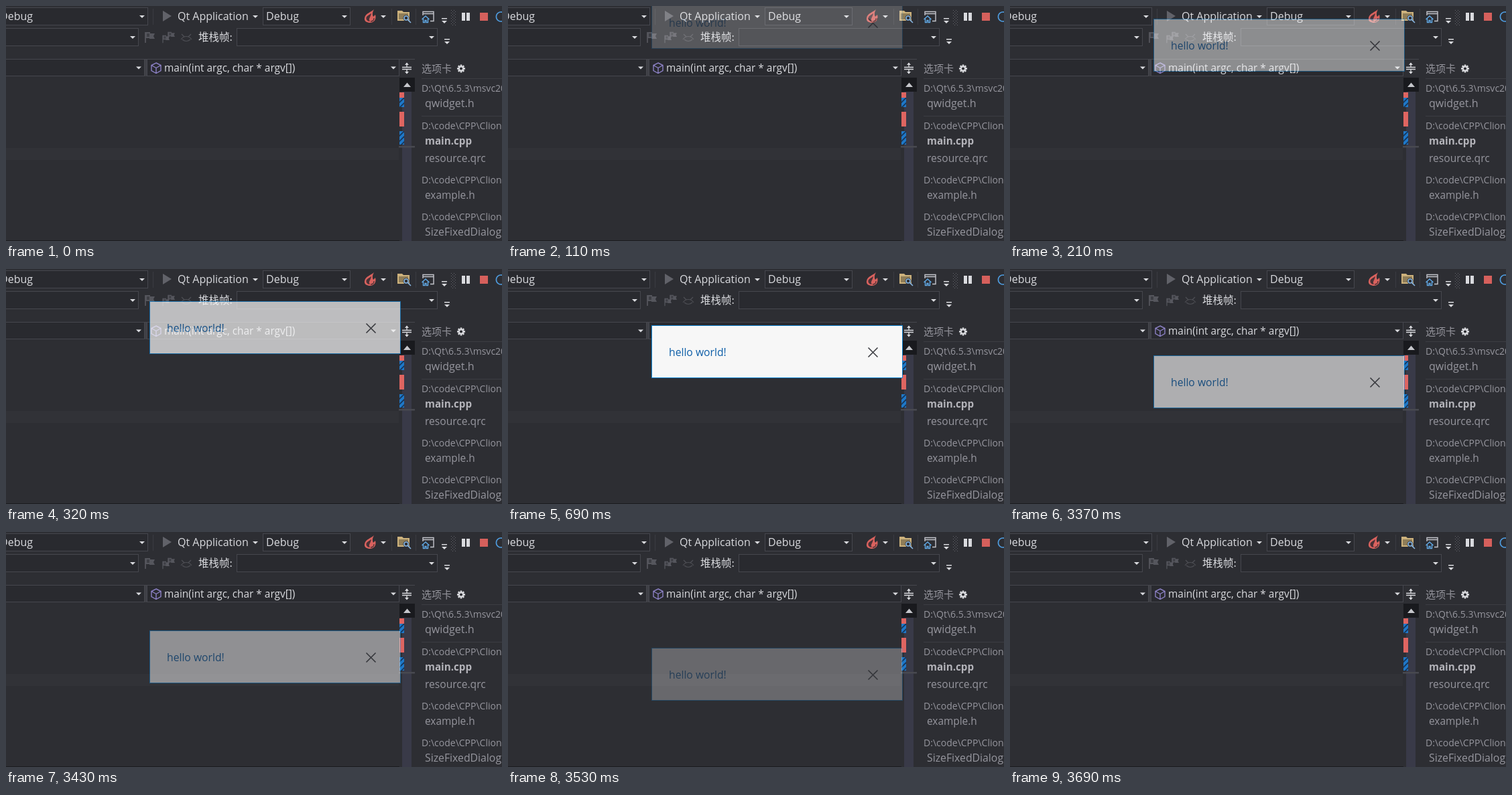
Animation, 740 px wide and 351 px high, one loop 3.94 s. Source, as an HTML page with a canvas:

```html
<!DOCTYPE html>
<html lang="zh">
<head>
<meta charset="utf-8">
<style>
  html, body { margin: 0; width: 100%; height: 100%; overflow: hidden; background: #2d2e33; }
  canvas { display: block; width: 740px; height: 351px; }
</style>
</head>
<body>
<canvas id="stage" width="740" height="351"></canvas>
<script>
const W = 740, H = 351, LOOP = 3940;
const FONT = '"Open Sans", "Noto Sans", "Noto Sans CJK SC", "Noto Sans CJK", sans-serif';
const CJK = '"Noto Sans CJK SC", "Noto Sans CJK", sans-serif';
const BG = '#2d2e33', LINE = '#46474e', LIGHT = '#d9dade', DIM = '#96969e';

function layer(w, h) {
  const c = document.createElement('canvas');
  c.width = w;
  c.height = h;
  return c;
}

function rect(g, x, y, w, h, color) {
  g.fillStyle = color;
  g.fillRect(x, y, w, h);
}

function frame(g, x, y, w, h, color, fill) {
  if (fill) rect(g, x, y, w, h, fill);
  g.strokeStyle = color;
  g.lineWidth = 1;
  g.strokeRect(x + .5, y + .5, w - 1, h - 1);
}

function text(g, s, x, y, size, color, weight = 400, family = FONT) {
  g.font = `${weight} ${size}px ${family}`;
  g.fillStyle = color;
  g.fillText(s, x, y);
}

function poly(g, pts, color) {
  g.beginPath();
  for (let i = 0; i < pts.length; i += 2) g.lineTo(pts[i], pts[i + 1]);
  g.closePath();
  g.fillStyle = color;
  g.fill();
}

function path(g, d, color, width = 1.2) {
  g.strokeStyle = color;
  g.lineWidth = width;
  g.stroke(new Path2D(d));
}

function shape(g, d, color) {
  g.fillStyle = color;
  g.fill(new Path2D(d));
}

function arrow(g, x, y, color = LIGHT) {
  poly(g, [x - 4, y - 2, x + 4, y - 2, x, y + 2], color);
}

function overflow(g, x, y) {
  rect(g, x - 4, y - 4, 8, 1.5, LIGHT);
  arrow(g, x, y + 2);
}

function combo(g, x, y, w, h) {
  frame(g, x, y, w, h, LINE, '#292a2f');
  arrow(g, x + w - 9, y + h / 2 + .5);
}

function toolbar(g) {
  combo(g, -20, 2, 232, 27);
  text(g, 'Debug', -9, 21, 16, LIGHT);
  rect(g, 219, 4, 1, 24, '#3b3c42');
  poly(g, [234, 7, 247, 15, 234, 23], '#616269');
  text(g, 'Qt Application', 256, 21, 16, LIGHT);
  arrow(g, 372, 16);
  combo(g, 383, 2, 131, 27);
  text(g, 'Debug', 388, 21, 16, LIGHT);

  // flame with a dark core
  shape(g, 'M549 5C545 9 536 11 535 18C534 23 539 25 543 25C549 25 553 20 551 13L548 16C546 12 547 9 549 5Z', '#d9625e');
  shape(g, 'M545 11C541 14 537 15 537.5 19C538 22 541 23 543 23C540 19 544 17 545 11Z', '#4a3136');
  path(g, 'M549 18C549 21 547 23 544 23', '#4a3136', 1.3);
  arrow(g, 563, 16);
  rect(g, 575, 4, 1, 24, '#3b3c42');

  // folder search
  shape(g, 'M584 7H591L593 9H602V22H584Z', '#cdb27c');
  rect(g, 586, 11, 14, 9, '#8f7d58');
  g.beginPath();
  g.arc(597, 18, 4.5, 0, 7);
  g.fillStyle = BG;
  g.fill();
  path(g, 'M600 18A3 3 0 1 1 594 18A3 3 0 1 1 600 18M599 20L604 25', '#86b6e4', 1.6);
  rect(g, 611, 4, 1, 24, '#3b3c42');

  // window with a house
  path(g, 'M622 14V8.5H638V22.5H633M622 11.5H638', '#c4c5cc', 1.4);
  path(g, 'M620.5 20L626 15L631.5 20M622.5 19V24.5H625V21.5H627V24.5H629.5V19', '#61a9e6', 1.4);
  overflow(g, 654, 22);
  for (let y = 6; y < 27; y += 4) {
    for (let x = 664; x < 670; x += 4) {
      rect(g, x, y, 1, 1, '#62636a');
      rect(g, x + 2, y + 2, 1, 1, '#62636a');
    }
  }
  rect(g, 680, 10, 5, 12, LIGHT);
  rect(g, 687, 10, 5, 12, LIGHT);
  rect(g, 707, 10, 12, 12, '#d6605c');
  path(g, 'M741 9.5A7 7 0 1 0 741 22.5', '#4f9de0', 1.6);
}

function flag(g, x, y) {
  path(g, `M${x} ${y}V${y + 16}`, '#5c5d64', 1.5);
  shape(g, `M${x} ${y}H${x + 7}V${y + 2}H${x + 14}L${x + 12} ${y + 6}L${x + 14} ${y + 10}H${x + 6}V${y + 9}H${x}Z`, '#55565d');
  rect(g, x + 2, y + 2, 4, 5, '#3d3e44');
}

function stackRow(g) {
  combo(g, -20, 33, 218, 27);
  flag(g, 208, 39);
  g.save();
  g.translate(234, 38);
  g.scale(.72, .72);
  flag(g, 0, 8);
  flag(g, 11, 1);
  g.restore();
  path(g, 'M261 50C265 44 273 44 277 50M263 50Q269 55 275 50M262 42L266 46M276 42L272 46', '#4e4f55', 1.2);
  text(g, '堆栈帧:', 287, 52, 15.5, LIGHT, 400, CJK);
  combo(g, 344, 33, 300, 27);
  overflow(g, 658, 53);
}

function navRow(g) {
  rect(g, 0, 79, 610, 1, LINE);
  combo(g, -20, 79, 227, 26);
  rect(g, 207, 80, 3, 25, '#3f4046');
  combo(g, 210, 79, 377, 26);
  path(g, 'M224 85L231 88.5V96.5L224 100.5L217 96.5V88.5ZM217 88.5L224 92.5L231 88.5M224 92.5V100.5', '#8b80c4', 1.4);
  text(g, 'main(int argc, char * argv[])', 236, 98, 15.4, LIGHT);
  path(g, 'M591 91.5H605M591 94.5H605M598 85V91M598 95V101', LIGHT, 1.3);
  poly(g, [595, 88, 601, 88, 598, 84.5], LIGHT);
  poly(g, [595, 98, 601, 98, 598, 101.5], LIGHT);
}

function marker(g, y, h) {
  rect(g, 587, y, 7, h, '#1f78c8');
  g.save();
  g.beginPath();
  g.rect(587, y, 7, h);
  g.clip();
  for (let k = y + 8; k < y + h + 6; k += 8) path(g, `M586 ${k}L595 ${k - 9}`, '#17365a', 1.6);
  g.restore();
}

function editor(g) {
  rect(g, 0, 212, 586, 18, '#313237');
  rect(g, 591, 128, 14, 223, '#393a48');
  rect(g, 587, 107, 23, 21, '#191a1e');
  poly(g, [593, 121, 604, 121, 598.5, 114.5], '#c5c6cb');
  rect(g, 587, 129, 7, 8, '#df6561');
  marker(g, 137, 14);
  rect(g, 587, 158, 7, 22, '#df6561');
  marker(g, 187, 20);
  rect(g, 586, 209, 24, 2.5, '#484950');
  rect(g, 0, 350, 587, 1, '#1b1c20');
}

function tabs(g) {
  text(g, '选项卡', 620, 98.5, 15, DIM, 400, CJK);
  g.save();
  g.translate(679, 93.5);
  for (let i = 0; i < 8; i++) {
    g.rotate(Math.PI / 4);
    rect(g, -1.3, -6, 2.6, 3, LIGHT);
  }
  g.beginPath();
  g.arc(0, 0, 3.2, 0, 7);
  g.strokeStyle = LIGHT;
  g.lineWidth = 2.2;
  g.stroke();
  g.restore();
  rect(g, 620, 108, 120, 1, '#3c3d43');
  rect(g, 620, 164, 120, 1, '#3c3d43');
  text(g, 'D:\\Qt\\6.5.3\\msvc2019_64', 620, 128, 14, DIM);
  for (const y of [184, 265, 320]) text(g, 'D:\\code\\CPP\\Clion', 620, y, 14, DIM);
  text(g, 'qwidget.h', 625, 151, 16, DIM);
  text(g, 'main.cpp', 625, 207, 15.2, '#b4b4ba', 700);
  text(g, 'resource.qrc', 625, 233, 15.6, DIM);
  text(g, 'example.h', 625, 288, 15.4, DIM);
  text(g, 'SizeFixedDialog', 625, 343, 15.8, DIM);
}

function drawWindow(g) {
  rect(g, 0, 0, W, H, BG);
  toolbar(g);
  stackRow(g);
  navRow(g);
  editor(g);
  tabs(g);
}

function drawToast(g) {
  frame(g, 0, 0, 375, 79, '#0f83d2', '#f7f7f7');
  text(g, 'hello world!', 26, 46, 15.7, '#0f5fa8');
  path(g, 'M323.5 33.5L337.5 47.5M337.5 33.5L323.5 47.5', '#3f4045', 1.6);
}

// The toast drops in, rests, then keeps dropping while it fades.
const IN = [50, 110, 160, 210, 270, 320, 380, 430, 480, 540];
const OUT = [3270, 3320, 3370, 3430, 3480, 3530, 3580, 3640, 3690];
const REST = 84, TRAVEL = 125;
const easeOut = u => u <= 0 ? 0 : u >= 1 ? 1 : 1 - (1 - u) ** 2;
const lastStep = (steps, t) => steps.filter(s => s <= t).pop();

function toastState(t) {
  if (t < IN[0] || t >= OUT[OUT.length - 1]) return null;
  if (t < IN[IN.length - 1]) {
    const p = easeOut((lastStep(IN, t) - 45) / 590);
    return { y: REST - TRAVEL * (1 - p), alpha: p };
  }
  if (t < OUT[0]) return { y: REST, alpha: 1 };
  const p = Math.min(.85, easeOut((lastStep(OUT, t) - 3247) / 613));
  return { y: REST + TRAVEL * p, alpha: 1 - p };
}

const ctx = document.getElementById('stage').getContext('2d');
const back = layer(W, H), toast = layer(375, 79);
drawWindow(back.getContext('2d'));
drawToast(toast.getContext('2d'));

const start = performance.now();
function tick() {
  const s = toastState((performance.now() - start) % LOOP);
  ctx.globalAlpha = 1;
  ctx.drawImage(back, 0, 0);
  if (s) {
    ctx.globalAlpha = s.alpha;
    ctx.drawImage(toast, 214, Math.round(s.y));
  }
  requestAnimationFrame(tick);
}
tick();
</script>
</body>
</html>
```
